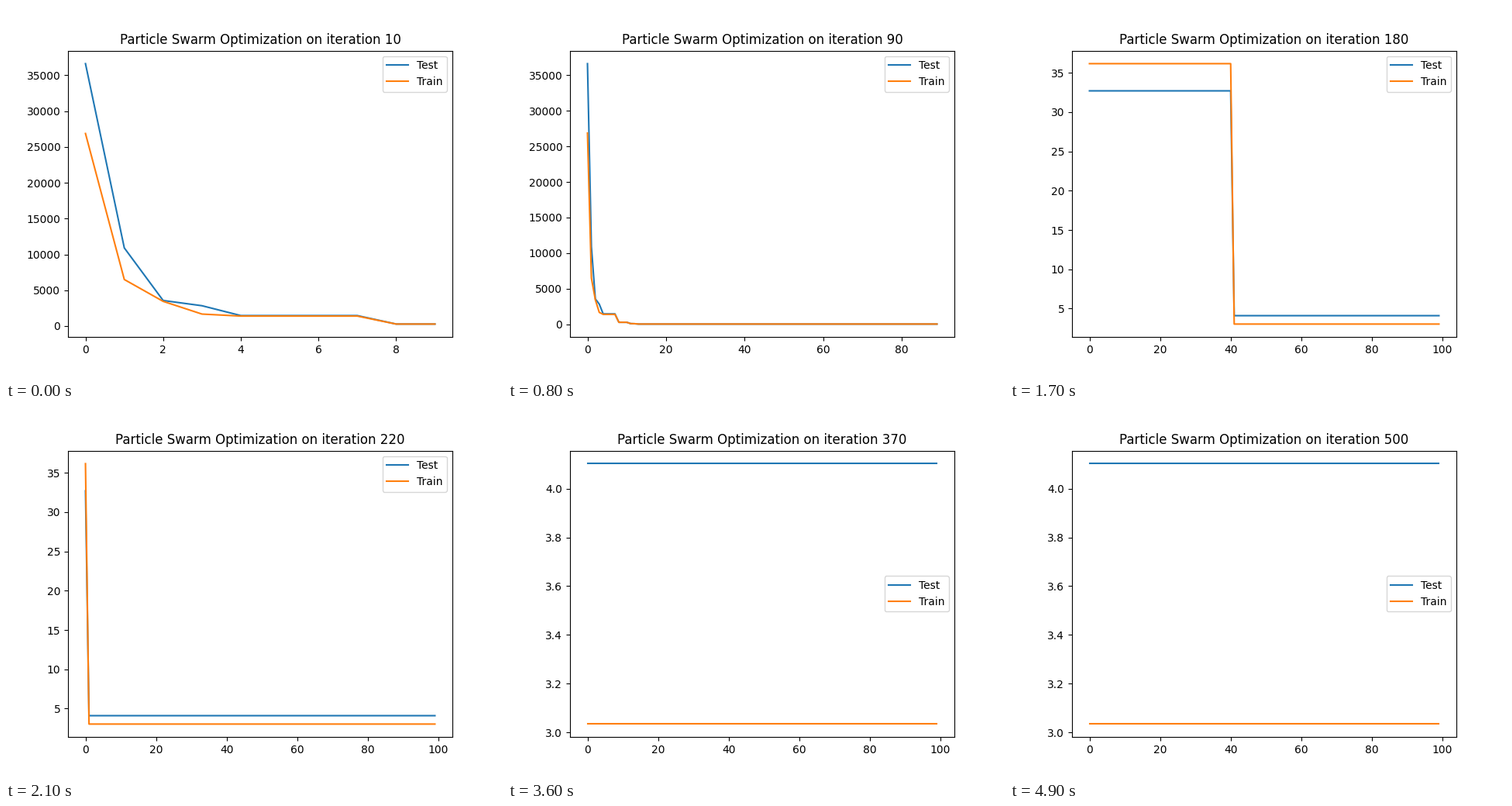
Animation, 640 px wide and 480 px high, one loop 5.91 s. Source, as a matplotlib script:

```python
import matplotlib.pyplot as plt
import numpy as np
from matplotlib.animation import FuncAnimation

LOOP = 5910      # ms
INTERVAL = 30    # ms
STEP = 100       # ms between iteration updates
LAST = 500       # final iteration
WINDOW = 100     # number of recent points on view
DROP = 121       # iteration of the last improvement


def history(start, plateau, final):
    """Error per iteration: a falling start, a long plateau, a final drop."""
    values = np.full(LAST, final)
    values[:DROP] = plateau
    values[:len(start)] = start
    return values


test = history([36630, 10910, 3570, 2840] + [1465] * 4 + [285] * 3 + [95, 80],
               32.71, 4.103)
train = history([26880, 6500, 3450, 1675] + [1395] * 4 + [280] * 3 + [100, 85],
                36.17, 3.034)

fig, ax = plt.subplots(figsize=(6.4, 4.8), dpi=100)
curves = [(ax.plot([], [], label=name)[0], data)
          for name, data in (("Test", test), ("Train", train))]
ax.legend(loc="best")


def update(i):
    step = (i * INTERVAL + 20) // STEP
    n = min(10 * (step + 1), LAST)
    for line, data in curves:
        recent = data[max(0, n - WINDOW):n]
        line.set_data(np.arange(len(recent)), recent)
    ax.relim()
    ax.autoscale_view()
    ax.set_title(f"Particle Swarm Optimization on iteration {n}")
    return [line for line, _ in curves]


anim = FuncAnimation(fig, update, frames=LOOP // INTERVAL, interval=INTERVAL,
                     repeat=True, repeat_delay=0, blit=False)
plt.show()
```
